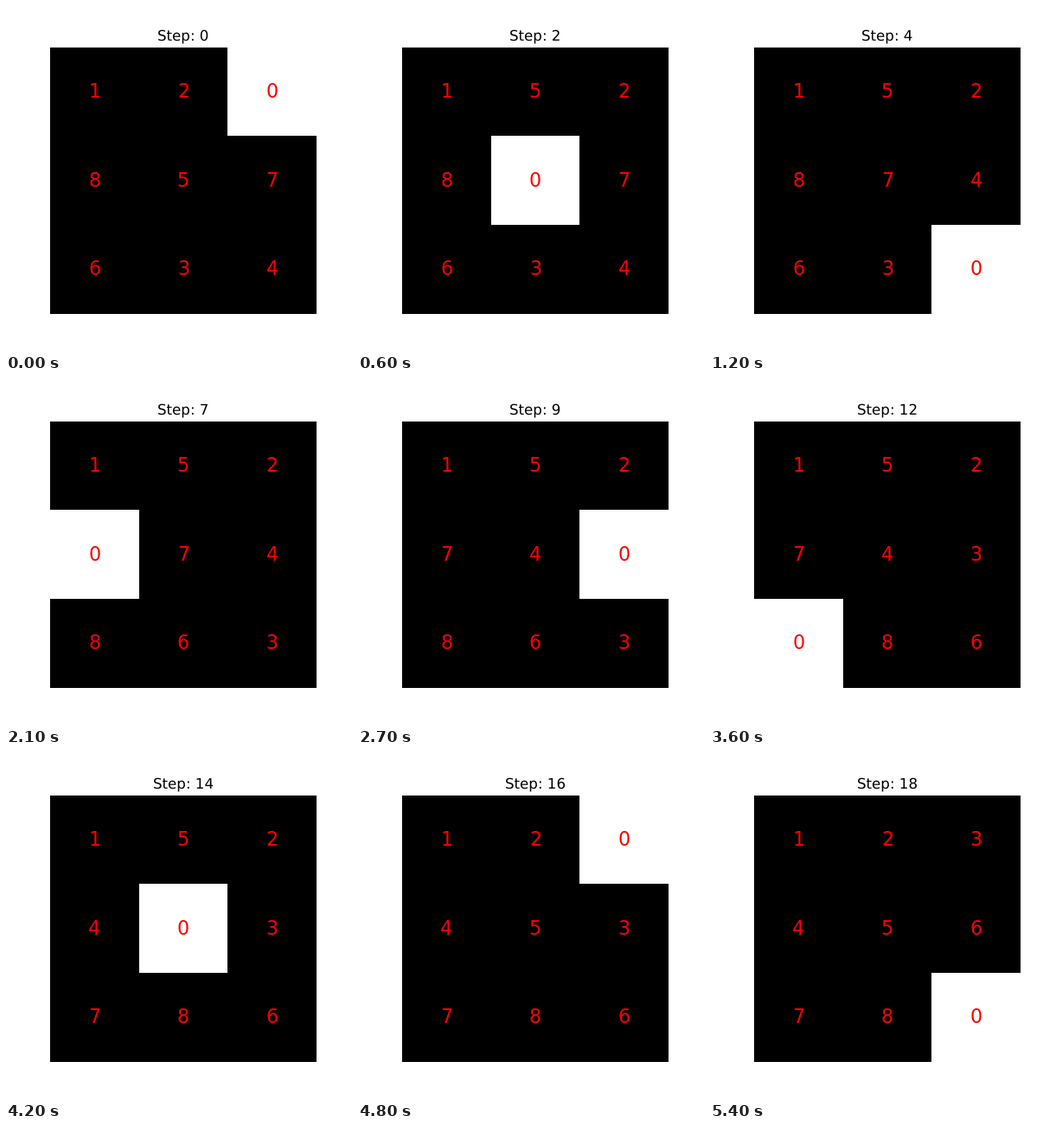
Animation of 400 by 400 pixels, one loop 5700 ms. Source, as an HTML page with a canvas:

```html
<!DOCTYPE html>
<html lang="en">
<head>
<meta charset="utf-8">
<title>Sliding puzzle</title>
<style>
  html, body { margin: 0; width: 100%; height: 100%; overflow: hidden; background: #fff; }
  canvas { display: block; }
</style>
</head>
<body>
<canvas id="stage" width="400" height="400"></canvas>
<script>
const ctx = document.getElementById('stage').getContext('2d');

const STEP_MS = 300;
const START = [1, 2, 0, 8, 5, 7, 6, 3, 4];
const MOVES = 'LDRDLLURRDLLURURDD';
const OFFSET = { L: -1, R: 1, U: -3, D: 3 };

const X_EDGES = [51, 154, 256, 359];
const Y_EDGES = [48, 150, 253, 356];
const BASELINES = [106, 209, 311];

// Every board from the start to the solved state.
const boards = [START];
for (const move of MOVES) {
  const board = boards[boards.length - 1].slice();
  const blank = board.indexOf(0);
  const next = blank + OFFSET[move];
  board[blank] = board[next];
  board[next] = 0;
  boards.push(board);
}

// Pen position that centres a digit's ink on whole pixels.
function digitX(digit, col) {
  if (col === 0) return digit === 4 ? 95 : 96;
  if (col === 1) return [2, 3, 7].includes(digit) ? 199 : 198;
  return 301;
}

function drawTitle(step) {
  ctx.fillStyle = '#000';
  ctx.font = '16.667px "DejaVu Sans", sans-serif';
  ctx.textRendering = 'geometricPrecision';
  ctx.fillText('Step: ' + step, step < 10 ? 175 : 170, 40);
  ctx.textRendering = 'auto';
}

function drawBoard(board) {
  ctx.fillStyle = '#000';
  ctx.fillRect(51, 48, 308, 308);

  const blank = board.indexOf(0);
  const col = blank % 3;
  const row = Math.floor(blank / 3);
  ctx.fillStyle = '#fff';
  ctx.fillRect(X_EDGES[col], Y_EDGES[row],
    X_EDGES[col + 1] - X_EDGES[col], Y_EDGES[row + 1] - Y_EDGES[row]);

  ctx.fillStyle = '#f00';
  ctx.font = '22.222px "DejaVu Sans", sans-serif';
  board.forEach((digit, i) => {
    ctx.fillText(digit, digitX(digit, i % 3), BASELINES[Math.floor(i / 3)]);
  });
}

function render() {
  const step = Math.floor(performance.now() / STEP_MS) % boards.length;
  ctx.fillStyle = '#fff';
  ctx.fillRect(0, 0, 400, 400);
  drawTitle(step);
  drawBoard(boards[step]);
  requestAnimationFrame(render);
}

render();
</script>
</body>
</html>
```
